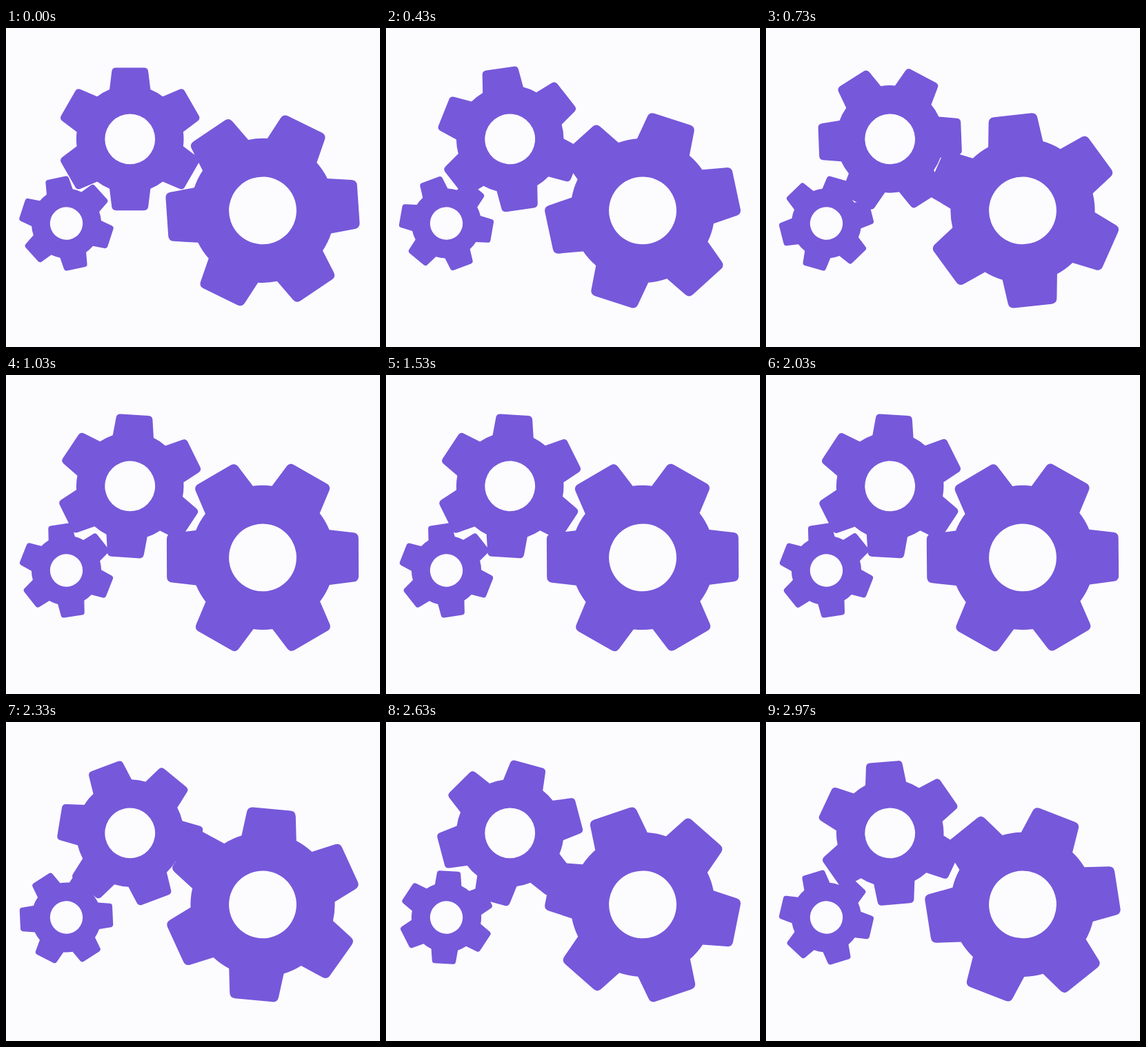
An HTML page that plays this animation: 542 by 462 pixels, repeating every 3010 ms.

```html
<!DOCTYPE html>
<html lang="en">
<head>
<meta charset="utf-8">
<title>Turning gears</title>
<style>
  html, body { margin: 0; width: 100%; height: 100%; overflow: hidden; background: #fcfcff; }
  svg { display: block; width: 542px; height: 462px; }
  path { fill: #7658da; fill-rule: evenodd; }
</style>
</head>
<body>
<svg viewBox="0 0 542 462"></svg>
<script>
const LOOP = 3010;       // ms
const STEP = 100 / 3;    // ms per pose
const LAST = 89;         // final pose of the loop
const TURN = 3.99;       // degrees per pose

const GEARS = [
  { x: 179.7, y: 160.9, scale: 1, angle: 0 },
  { x: 372, y: 264.4, scale: 1.344, angle: 26.1 },
  { x: 87.5, y: 283, scale: 0.65, angle: -12 }
];

// Six tapered teeth with rounded tips around a ring, in unit-gear pixels.
function gearPath() {
  const body = 77.8, tip = 103.4, half = 25.8, hole = 36.4, round = 5.5;
  const base = 22.4 * Math.PI / 180;
  const bx = body * Math.sin(base), by = body * Math.cos(base);
  const len = Math.hypot(bx - half, tip - by);
  const fx = half + (bx - half) * round / len;
  const fy = tip - (tip - by) * round / len;
  let d = '';
  for (let i = 0; i < 6; i++) {
    const a = i * Math.PI / 3, c = Math.cos(a), s = Math.sin(a);
    const p = (x, y) => `${(x * c + y * s).toFixed(2)} ${(x * s - y * c).toFixed(2)}`;
    d += i ? `A${body} ${body} 0 0 1 ${p(-bx, by)}` : `M${p(-bx, by)}`;
    d += `L${p(-fx, fy)}Q${p(-half, tip)} ${p(round - half, tip)}`;
    d += `L${p(half - round, tip)}Q${p(half, tip)} ${p(fx, fy)}L${p(bx, by)}`;
  }
  d += `A${body} ${body} 0 0 1 ${-bx} ${-by}Z`;
  return d + `M${hole} 0A${hole} ${hole} 0 1 0 ${-hole} 0A${hole} ${hole} 0 1 0 ${hole} 0Z`;
}

const svg = document.querySelector('svg');
const outline = gearPath();
for (const gear of GEARS) {
  gear.node = document.createElementNS('http://www.w3.org/2000/svg', 'path');
  gear.node.setAttribute('d', outline);
  svg.append(gear.node);
}

function draw(time) {
  // Poses change on 10 ms ticks.
  const tick = Math.floor((time % LOOP) / 10) * 10;
  const pose = Math.min(LAST, Math.floor((tick + 4) / STEP));
  for (const { node, x, y, scale, angle } of GEARS) {
    node.setAttribute('transform',
      `translate(${x} ${y}) rotate(${angle + pose * TURN}) scale(${scale})`);
  }
}

const start = performance.now();
function loop() {
  draw(performance.now() - start);
  requestAnimationFrame(loop);
}
loop();
</script>
</body>
</html>
```
